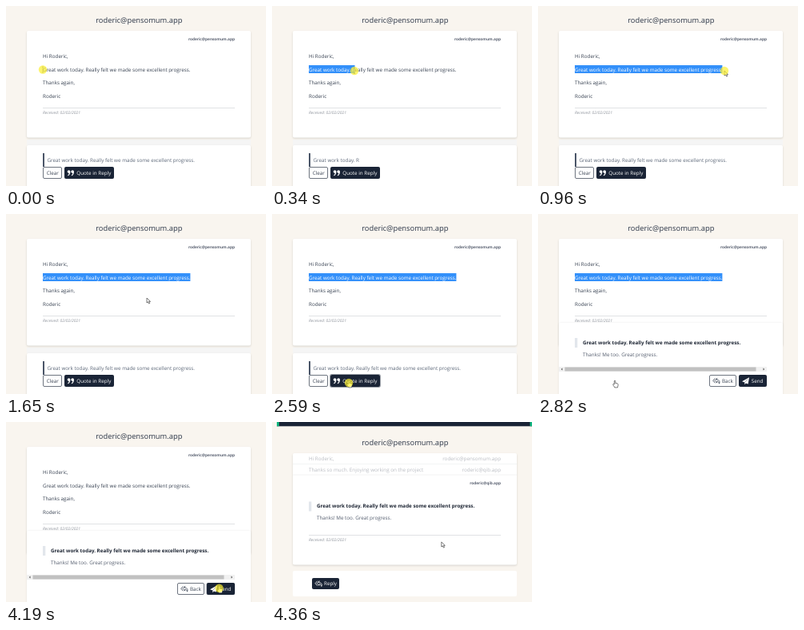
An HTML page for the animation above (5520 ms loop, 325x225 px).

```html
<!DOCTYPE html>
<html lang="en">
<head>
<meta charset="utf-8">
<title>Quote and reply</title>
<style>
  html, body { margin: 0; width: 100%; height: 100%; overflow: hidden; background: #f9f5ef; }
  svg { display: block; width: 325px; height: 225px; }
  text {
    font: 6.29px "Open Sans", "Noto Sans", sans-serif;
    fill: #374151;
    text-rendering: geometricPrecision;
    white-space: pre;
  }
  .title { font-size: 9.34px; fill: #2d3748; text-anchor: middle; }
  .end { text-anchor: end; }
  .from { font-size: 4.75px; font-weight: 700; fill: #596070; text-anchor: end; }
  .date { font-size: 5px; font-style: italic; fill: #92979f; }
  .faded text { fill: #b9bcc2; }
  .bold { font-size: 6.26px; font-weight: 700; fill: #1f2735; }
  .quote { fill: #5c6778; }
  .answer { fill: #535c6d; }
  .light { fill: #fff; }
  text.light { font-weight: 500; }
  .card { fill: #fff; filter: drop-shadow(0 1.6px 1px rgba(0, 0, 0, .14)); }
  .panel { fill: #fff; filter: drop-shadow(0 0 .8px rgba(0, 0, 0, .08)); }
  .rule { stroke: #d9dbde; stroke-width: .8; }
  .dark { fill: #1a2436; }
  .outlined { fill: #fff; stroke: #4b5361; stroke-width: .8; }
  .ring { fill: none; stroke: #1a2436; stroke-opacity: .45; stroke-width: 1.2; }
  .line { fill: none; stroke: currentColor; stroke-width: .8; stroke-linejoin: round; stroke-linecap: round; }
  .pointer { fill: #fff; stroke: #222; stroke-width: .6; stroke-linejoin: round; }
  .beam { fill: none; stroke: #444; stroke-width: .5; }
</style>
</head>
<body>
<svg viewBox="0 0 325 225">
  <defs>
    <clipPath id="selected"><rect id="selectedArea" x="46" y="74" width="0" height="10"/></clipPath>
    <g id="replyIcon" class="line">
      <path d="M2.7 .3 .2 3l2.500 2.700"/>
      <path d="M5 .3 2.400 3 5 5.700V4.100c2 0 2.900.7 3 2.700C9.300 4.100 8 1.900 5 1.900Z"/>
    </g>
    <path id="mark" d="M0 1.800a1.800 1.800 0 1 1 3.700 0C3.700 4.800 2.500 6.600.6 7V5.800C1.600 5.400 2 4.700 2 3.700 .8 3.700 0 2.900 0 1.800Z"/>
  </defs>

  <g id="reading">
    <text class="title" x="166.300" y="21">roderic@pensomum.app</text>
    <rect x="26" y="167" width="280" height="7" fill="#f5f5f5"/>
    <rect class="card" x="26" y="31" width="280" height="133.500" rx="2"/>
    <text class="from" x="286" y="43">roderic@pensomum.app</text>
    <text x="46" y="65">Hi Roderic,</text>
    <text id="sentence" x="46" y="81.700">Great work today. Really felt we made some excellent progress.</text>
    <g id="selection">
      <rect id="selectionFill" x="46" y="74" width="0" height="10" fill="#3390fa"/>
      <text class="light" x="46" y="81.700" style="font-weight:400" clip-path="url(#selected)">Great work today. Really felt we made some excellent progress.</text>
    </g>
    <text x="46" y="98.300">Thanks again,</text>
    <text x="46" y="115">Roderic</text>
    <path class="rule" d="M46 127.500H286"/>
    <text class="date" x="46" y="135">Received: 02/02/2021</text>
  </g>

  <g id="quoting">
    <rect class="card" x="26" y="174" width="280" height="60" rx="2"/>
    <rect x="46" y="184" width="2" height="17" fill="#4a5568"/>
    <text class="quote" id="quoted" x="51.500" y="195"></text>
    <rect class="outlined" x="46.500" y="201.500" width="23" height="14" rx="1.500"/>
    <text x="50.800" y="210.900">Clear</text>
    <rect class="dark" x="73" y="201" width="62" height="15" rx="2"/>
    <rect class="ring" id="quoteRing" x="72.700" y="200.700" width="62.600" height="15.600" rx="2"/>
    <g class="light"><use href="#mark" x="76.700" y="205.200"/><use href="#mark" x="81.300" y="205.200"/></g>
    <text class="light" x="88.300" y="210.900">Quote in Reply</text>
  </g>

  <g id="composing">
    <rect class="panel" x="26" y="136" width="280" height="100" rx="2"/>
    <rect x="46" y="155" width="3.300" height="12" fill="#e2e6ec"/>
    <text class="bold" x="56" y="163.300">Great work today. Really felt we made some excellent progress.</text>
    <text class="answer" x="56" y="178.300">Thanks! Me too. Great progress.</text>
    <rect id="caret" x="149" y="171" width="1" height="9" fill="#333"/>
    <rect x="26" y="191" width="260" height="6" fill="#f1f1f1"/>
    <rect x="33.500" y="191.500" width="239" height="5" fill="#c1c1c1"/>
    <path d="M30.500 192.600v2.800L28.800 194ZM281.500 192.600v2.800l1.700-1.400Z" fill="#555"/>
    <rect class="outlined" x="214.500" y="201.500" width="33" height="14" rx="1.500"/>
    <use href="#replyIcon" x="218.500" y="205.300" color="#374151"/>
    <text x="230" y="210.900">Back</text>
    <rect class="dark" x="251" y="201" width="35" height="15" rx="2"/>
    <rect class="ring" id="sendRing" x="251" y="201.500" width="34.500" height="14" rx="2"/>
    <path class="light" d="M255 209.300 264 204.200 262.600 212.600 259.800 211.500 258.300 213.200V210.600Z"/>
    <path d="M258.300 210.600 262.300 206.200" stroke="#1a2436" stroke-width=".4"/>
    <text class="light" x="266.700" y="210.900">Send</text>
  </g>

  <g id="sent">
    <rect class="dark" x="6" width="319" height="5.300"/>
    <path d="M6 0h2.800v5.300H6ZM322.500 0H325v5.300h-2.500Z" fill="#10b981"/>
    <text class="title" x="166.300" y="29">roderic@pensomum.app</text>
    <rect class="card" x="26" y="39" width="280" height="139.500" rx="2"/>
    <g class="faded">
      <text x="46" y="48">Hi Roderic,</text>
      <text class="end" x="286" y="48">roderic@pensomum.app</text>
      <text x="46" y="61.500">Thanks so much. Enjoying working on the project</text>
      <text class="end" x="286" y="61.500">roderic@qib.app</text>
    </g>
    <path d="M26 52.500H306M26 66H306" stroke="#f0f1f2" stroke-width=".8"/>
    <text class="from" x="286" y="78">roderic@qib.app</text>
    <rect x="46" y="99.500" width="3.300" height="12" fill="#e2e6ec"/>
    <text class="bold" x="56" y="107.300">Great work today. Really felt we made some excellent progress.</text>
    <text class="answer" x="56" y="122.300">Thanks! Me too. Great progress.</text>
    <path class="rule" d="M46 141.500H286"/>
    <text class="date" x="46" y="149">Received: 02/02/2021</text>
    <rect class="light" x="26" y="186" width="280" height="32" rx="2"/>
    <rect class="dark" x="50" y="195" width="34" height="14" rx="2"/>
    <use href="#replyIcon" x="53.800" y="198.700" color="#fff"/>
    <text class="light" x="65" y="204.400">Reply</text>
  </g>

  <g id="cursor">
    <path class="pointer" id="arrow" d="M0 0V6L1.500 4.800 2.600 7.100 3.700 6.600 2.700 4.400H4.500Z"/>
    <path class="beam" id="beam" d="M-1.200-3.500H1.200M0-3.500V3.500M-1.200 3.500H1.200"/>
    <path class="pointer" id="hand" d="M-.7 4.500V.5C-.7-.6.8-.6.8.5V3.200C2.300 2.900 4.200 3.300 4.200 4.800 4.200 6.500 3.500 7 3.500 8.400H-.2C-.5 7-2.300 5.800-2.300 4.500-2.200 3.700-1.300 3.800-.7 4.500Z"/>
    <circle id="press" r="5.200" fill="#fbf030" opacity=".7"/>
  </g>
</svg>
<script>
  const LOOP = 5520;
  const $ = id => document.getElementById(id);
  const show = (id, on) => $(id).style.display = on ? '' : 'none';
  const within = (t, from, to) => t >= from && t < to;

  // Cursor stops: time, x, y, shape
  const stops = [
    [0, 46, 79.5, 'beam'], [150, 57, 80, 'beam'], [230, 78, 80, 'beam'],
    [310, 103, 81, 'beam'], [400, 130, 81, 'beam'], [480, 157, 82, 'beam'],
    [570, 181, 82, 'beam'], [650, 196, 82, 'beam'], [730, 210, 82, 'beam'],
    [810, 221, 82, 'beam'], [890, 229, 81, 'beam'], [960, 233, 81, 'arrow'],
    [1040, 235.5, 81, 'arrow'], [1650, 176, 105, 'arrow'], [1730, 150, 136, 'arrow'],
    [1810, 130, 162, 'arrow'], [1880, 116, 182, 'arrow'], [1960, 106, 195, 'arrow'],
    [2040, 100, 203, 'arrow'], [2110, 97, 207, 'arrow'], [2190, 95, 209, 'arrow'],
    [2270, 96, 208.5, 'hand'], [2970, 80.5, 176.5, 'beam'], [3660, 150, 190, 'arrow'],
    [3740, 228, 203, 'arrow'], [3810, 266.5, 205.3, 'hand'], [4360, 211.8, 150, 'arrow']
  ];

  const sentence = $('sentence');
  const full = sentence.textContent;
  const left = 46;

  // Distance from the start of the sentence to each character boundary
  const widths = [0];
  for (let n = 1; n <= full.length; n++) widths.push(sentence.getSubStringLength(0, n));

  // Number of characters whose boundary lies nearest to x
  function charsUpTo(x) {
    const gap = n => Math.abs(left + widths[n] - x);
    return widths.reduce((best, _, n) => gap(n) < gap(best) ? n : best, 0);
  }

  function render(t) {
    const [, x, y, shape] = stops.findLast(stop => stop[0] <= t);
    show('reading', t < 4360);
    show('quoting', t < 2820);
    show('composing', within(t, 2820, 4360));
    show('sent', t >= 4360);

    const count = t >= 1040 ? full.length : charsUpTo(x);
    $('selectedArea').setAttribute('width', widths[count]);
    $('selectionFill').setAttribute('width', widths[count]);
    show('selection', within(t, 150, 2970));
    $('quoted').textContent = t < 150 ? full : full.slice(0, count);

    const quoteClick = within(t, 2590, 2820);
    const sendClick = within(t, 4190, 4360);
    show('quoteRing', quoteClick);
    show('sendRing', sendClick);
    show('caret', within(t, 2970, 3430));

    $('cursor').setAttribute('transform', `translate(${x} ${y})`);
    for (const name of ['arrow', 'beam', 'hand']) show(name, name === shape);
    show('press', t < 1190 || quoteClick || sendClick);
    $('press').setAttribute('cy', shape === 'hand' ? 2.5 : 0);
  }

  const start = performance.now();
  function tick() {
    render((performance.now() - start) % LOOP);
    requestAnimationFrame(tick);
  }
  tick();
</script>
</body>
</html>
```
